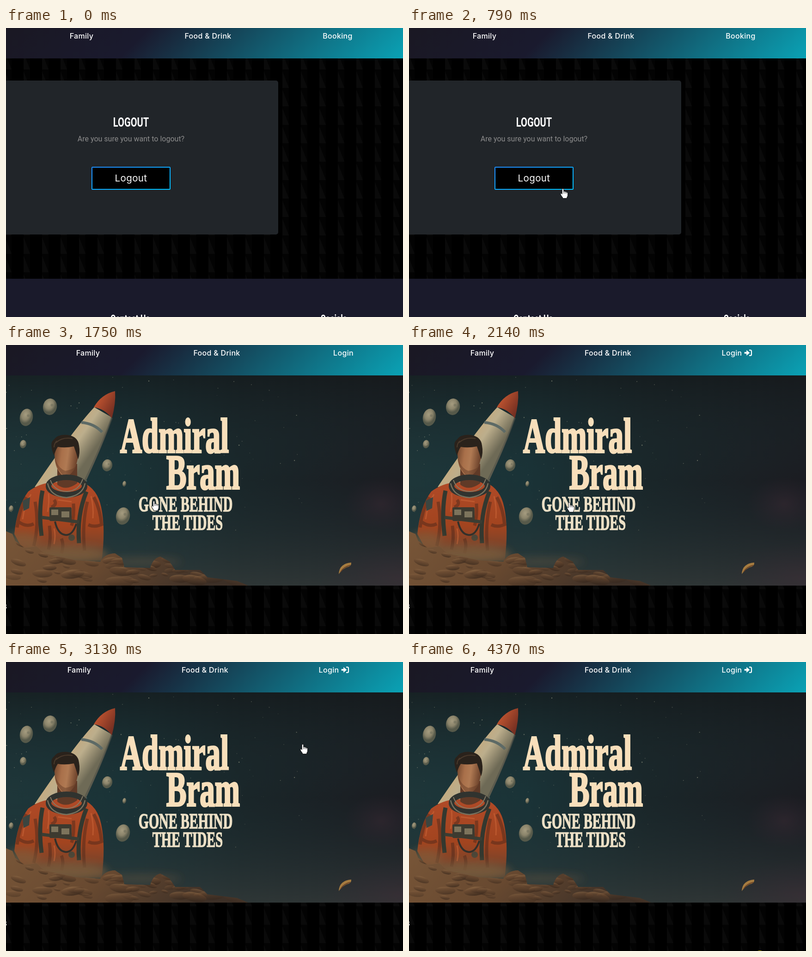
Recreate the animation shown at these times as an HTML page. Size 859 by 627 pixels, loop 4.43 s.

```html
<!DOCTYPE html>
<html lang="en">
<head>
<meta charset="utf-8">
<title>Logout</title>
<style>
  html, body { margin: 0; width: 100%; height: 100%; overflow: hidden; background: #000; }
  svg { display: block; width: 100vw; height: 100vh; overflow: hidden; }
  .nav { font: 500 16px Inter, "Open Sans", sans-serif; letter-spacing: .3px; fill: #fff; }
  .mid { text-anchor: middle; }
  .head { font: 700 28px Roboto, sans-serif; fill: #fff; }
  .foot { font-size: 24px; }
  .note { font: 400 16px Roboto, sans-serif; fill: #8c8c8c; }
  .btn { font: 400 20.5px Inter, "Open Sans", sans-serif; letter-spacing: .4px; fill: #fff; }
  .title { font: 700 105px "Liberation Serif", serif; fill: #f8dfbb; stroke: #f8dfbb; stroke-width: 4px; }
  .sub { font: 700 46px "Liberation Serif", serif; fill: #ece0c6; stroke: #ece0c6; stroke-width: 1.6px; }
</style>
</head>
<body>
<svg viewBox="0 0 859 627" preserveAspectRatio="none">
  <defs>
    <linearGradient id="bar" gradientUnits="userSpaceOnUse" x1="0" y1="0" x2="462.5" y2="462.5">
      <stop offset="0" stop-color="#1a1823"/><stop offset=".335" stop-color="#1a1a2e"/>
      <stop offset="1" stop-color="#0aa2b5"/>
    </linearGradient>
    <linearGradient id="edge" x1="0" y1="0" x2="1" y2="1">
      <stop offset=".1" stop-color="#1e90ff"/><stop offset=".85" stop-color="#00bfff"/>
    </linearGradient>
    <linearGradient id="sky" x1="0" y1="0" x2="1" y2="0">
      <stop offset="0" stop-color="#1e3639"/><stop offset=".3" stop-color="#1a3337"/>
      <stop offset=".6" stop-color="#1a2629"/><stop offset="1" stop-color="#1b1c21"/>
    </linearGradient>
    <linearGradient id="haze" x1="0" y1="0" x2="0" y2="1">
      <stop offset="0" stop-color="#14191b" stop-opacity=".7"/><stop offset=".5" stop-color="#1d3034" stop-opacity="0"/>
      <stop offset="1" stop-color="#393f3d" stop-opacity=".65"/>
    </linearGradient>
    <radialGradient id="plum">
      <stop offset="0" stop-color="#432c38" stop-opacity=".4"/><stop offset="1" stop-color="#3a2634" stop-opacity="0"/>
    </radialGradient>
    <linearGradient id="hull" gradientUnits="userSpaceOnUse" x1="120" y1="190" x2="185" y2="235">
      <stop offset="0" stop-color="#c9a878"/><stop offset=".5" stop-color="#bcae8c"/><stop offset="1" stop-color="#6e6a56"/>
    </linearGradient>
    <linearGradient id="cone" gradientUnits="userSpaceOnUse" x1="200" y1="120" x2="234" y2="140">
      <stop offset="0" stop-color="#b9512f"/><stop offset="1" stop-color="#763022"/>
    </linearGradient>
    <linearGradient id="suit" x1="0" y1="0" x2="0" y2="1">
      <stop offset="0" stop-color="#b04a27"/><stop offset=".55" stop-color="#a2441f"/>
      <stop offset=".8" stop-color="#7d442a"/><stop offset="1" stop-color="#5f432e" stop-opacity=".5"/>
    </linearGradient>
    <linearGradient id="skin" x1="0" y1="0" x2="1" y2=".2">
      <stop offset="0" stop-color="#6d432b"/><stop offset=".35" stop-color="#a9704a"/>
      <stop offset=".6" stop-color="#b07a53"/><stop offset="1" stop-color="#6c422b"/>
    </linearGradient>
    <linearGradient id="rock" x1="0" y1="0" x2="1" y2=".25">
      <stop offset="0" stop-color="#785638"/><stop offset=".5" stop-color="#684930"/><stop offset="1" stop-color="#3d3027"/>
    </linearGradient>
    <linearGradient id="pebble" x1="0" y1="0" x2=".3" y2="1">
      <stop offset="0" stop-color="#a27b52"/><stop offset=".4" stop-color="#674830"/><stop offset="1" stop-color="#35251a"/>
    </linearGradient>
    <radialGradient id="stone" cx=".4" cy=".35">
      <stop offset="0" stop-color="#a59c80"/><stop offset=".6" stop-color="#8b846b"/><stop offset="1" stop-color="#56594a"/>
    </radialGradient>
    <pattern id="tile" patternUnits="userSpaceOnUse" x="38" y="14" width="40" height="40">
      <rect width="40" height="40"/>
      <rect width="14" height="40" fill="#030303"/>
      <path d="M0 0V36H14Z" fill="#0a0a0a"/>
    </pattern>
    <filter id="soft" x="-50%" y="-100%" width="200%" height="300%"><feGaussianBlur stdDeviation="12"/></filter>
    <filter id="inner" x="-20%" y="-50%" width="140%" height="200%"><feGaussianBlur stdDeviation="5"/></filter>
    <filter id="dust" x="-30%" y="-80%" width="160%" height="260%"><feGaussianBlur stdDeviation="9"/></filter>
    <clipPath id="face"><rect x="185" y="301" width="171" height="50"/></clipPath>
    <clipPath id="frame"><rect y="66" width="859" height="456"/></clipPath>
    <clipPath id="land"><use href="#ground"/></clipPath>
  </defs>

  <rect y="66" width="859" height="561" fill="url(#tile)"/>

  <g id="logout">
    <rect x="-20" y="114" width="609" height="334" rx="5" fill="#212529"/>
    <text class="head mid" transform="translate(270.5 214) scale(.72 1)">LOGOUT</text>
    <text class="note mid" x="270.5" y="246">Are you sure you want to logout?</text>
    <rect class="glow" x="181" y="297" width="179" height="58" fill="#00a8e8" opacity="0" filter="url(#soft)"/>
    <rect x="185" y="301" width="171" height="50" rx="2"/>
    <g clip-path="url(#face)"><rect class="glow" x="185" y="301" width="171" height="50" fill="none"
      stroke="#00bfff" stroke-width="9" opacity="0" filter="url(#inner)"/></g>
    <rect x="186" y="302" width="169" height="48" rx="1" fill="none" stroke="url(#edge)" stroke-width="2"/>
    <text class="btn mid" x="270.5" y="333">Logout</text>
    <rect y="544" width="859" height="83" fill="#1a1a2b"/>
    <text class="head foot" transform="translate(226 639) scale(.72 1)">Contact Us</text>
    <text class="head foot" transform="translate(681 639) scale(.72 1)">Socials</text>
  </g>

  <g id="home">
    <g clip-path="url(#frame)">
      <rect y="66" width="859" height="456" fill="url(#sky)"/>
      <rect y="66" width="859" height="456" fill="url(#haze)"/>
      <ellipse cx="812" cy="345" rx="80" ry="60" fill="url(#plum)"/>
      <ellipse cx="850" cy="505" rx="170" ry="80" fill="url(#plum)"/>
      <g id="stars"></g>
      <g id="stones" fill="url(#stone)"></g>

      <path d="M191 135Q150 178 62 308L165 312Q208 222 229 157Z" fill="url(#hull)"/>
      <path d="M236 100Q206 107 190 135Q213 138 229 159Q238 127 236 100Z" fill="url(#cone)"/>
      <path d="M163 168Q190 170 208 189" fill="none" stroke="#5d6a66" stroke-width="6"/>
      <path d="M229 158Q205 225 165 306" fill="none" stroke="#4f5149" stroke-width="4" opacity=".6"/>

      <path d="M18 410Q24 350 48 318Q72 300 100 298H166Q198 312 206 352Q216 400 207 468H50Z" fill="url(#suit)"/>
      <g fill="none" stroke="#4f2a1c" stroke-width="7" opacity=".5">
        <path d="M63 340Q72 390 60 436M176 340Q164 390 170 446M28 384Q44 396 60 388M178 390Q193 397 210 388"/>
        <path d="M104 336Q112 346 98 352M146 344Q148 370 142 392M94 392Q98 420 92 444M120 420Q126 434 120 452"/>
        <path d="M190 330Q204 356 207 392M44 330Q28 360 24 396"/>
      </g>
      <g fill="none" stroke="#d0693a" stroke-width="3" opacity=".5">
        <path d="M54 324Q40 346 36 378M92 322Q94 340 90 362M184 328Q190 350 188 376M112 336L142 340M104 398Q108 414 104 432"/>
      </g>
      <path d="M111 262V303Q130 318 154 300V258Z" fill="#603a27"/>
      <path d="M105 222Q104 252 110 266Q117 282 127 286Q138 285 149 268Q158 246 157 218Q130 204 105 222Z" fill="url(#skin)"/>
      <path d="M105 244Q107 268 127 286Q140 284 151 264Q140 272 128 273Q113 268 105 244Z" fill="#5f3925" opacity=".45"/>
      <path d="M104 240Q93 213 103 206Q112 193 132 195Q156 198 158 218Q161 234 156 248Q152 234 147 220Q128 224 112 221Q107 228 104 240Z" fill="#2a221b"/>
      <path d="M108 212Q122 199 144 203M104 222Q104 214 110 208" fill="none" stroke="#584433" stroke-width="2" opacity=".7"/>
      <ellipse cx="131" cy="306" rx="39" ry="19" fill="none" stroke="#30332f" stroke-width="12"/>
      <path d="M90 300Q96 329 131 331Q166 327 171 300" fill="none" stroke="#77725f" stroke-width="2.5"/>
      <path d="M96 293Q104 317 132 318Q158 316 166 291" fill="none" stroke="#847b66" stroke-width="2"/>
      <path d="M79 316Q70 360 77 414M174 318Q153 370 158 430" fill="none" stroke="#33382f" stroke-width="9"/>
      <path d="M77 374L158 384" stroke="#3b3d33" stroke-width="7"/>
      <rect x="94" y="352" width="48" height="30" rx="3" fill="#3d3a2f"/>
      <path d="M98 357H113V369H98ZM120 361H137V374H120Z" fill="#7d745c"/>
      <path d="M106 383Q112 410 128 412T152 388" fill="none" stroke="#33302a" stroke-width="4"/>
      <circle cx="142" cy="418" r="7" fill="#4b4638"/>
      <path d="M36 338L52 330L50 354L38 360Z" fill="#3b4540"/>

      <g fill="#80603f" filter="url(#dust)">
        <ellipse cx="124" cy="455" rx="95" ry="20" opacity=".75"/>
        <ellipse cx="36" cy="425" rx="36" ry="18" opacity=".6"/>
        <ellipse cx="290" cy="470" rx="90" ry="10" opacity=".3"/>
      </g>
      <path id="ground" d="M0 404L14 410L20 425L40 440L66 437L82 452L118 460L150 467L204 470Q214 452 236 452L251 462L256 482L312 484Q318 462 334 459L354 470L366 488L420 488L436 504L500 512L524 522H0Z" fill="url(#rock)"/>
      <g id="rubble" fill="url(#pebble)" clip-path="url(#land)"></g>
      <path d="M720 497Q721 474 747 472Q748 480 738 482Q728 486 720 497Z" fill="#a67c40"/>
      <path d="M724 492Q731 481 745 478" fill="none" stroke="#6b4327" stroke-width="2"/>

      <g id="titles"></g>
    </g>
    <text class="head" style="font-size:20px" x="2" y="573" text-anchor="end">s</text>
  </g>

  <rect width="859" height="66" fill="url(#bar)"/>
  <g class="nav mid">
    <text id="n0" y="23">Family</text><text id="n1" y="23">Food &amp; Drink</text><text id="n2" y="23"></text>
  </g>
  <g id="icon" fill="none" stroke="#fff" stroke-width="2.2">
    <path d="M736 11.2H738.5Q741 11.2 741 13.6V20.4Q741 22.8 738.5 22.8H736"/>
    <path d="M726 15.5H730.5V11.5L737 17L730.5 22.5V18.5H726Z" fill="#fff" stroke-width=".6"/>
  </g>

  <circle id="ring" cx="759" cy="638" r="12" fill="#b9aa00"/>
  <g id="cursor">
    <path id="arrow" d="M0 0V16L3.8 12.5L6.5 18.5L9 17.4L6.4 11.6H11.6Z" fill="#fff" stroke="#000" stroke-width=".8"/>
    <g id="hand">
      <path d="M-1.8 1.6Q0 -1 1.8 1.6V6.6Q3.8 5.4 4.8 7.2Q6.8 6.4 7.8 8.2Q10.6 7.8 10.6 10.6V14.5Q10.6 17.5 8.8 19.2V21.6H-.6V19.6Q-3.4 16.6 -5 13Q-5.6 10.4 -3.4 10.6L-1.8 12.4Z" fill="#fff" stroke="#000" stroke-width=".9"/>
      <path d="M1.8 6.6V11M4.9 7.6V11M7.8 8.6V11.4" stroke="#000" stroke-width=".8"/>
    </g>
  </g>
</svg>
<script>
const LOOP = 4430, SWAP = 1750, ICON_IN = 1780;
const $ = id => document.getElementById(id);
const show = (id, on) => { $(id).style.display = on ? '' : 'none'; };

// Cursor tip: time, x, y
const path = [
  [160, 788, 622], [240, 715, 577], [340, 595, 508], [440, 485, 442], [540, 408, 394], [670, 355, 362],
  [730, 343, 354], [790, 333, 348], [920, 323, 340], [1020, 320, 338],
  [2040, 320, 338], [2080, 322, 347], [2140, 346, 342], [2200, 420, 298], [2280, 540, 232],
  [2340, 605, 204], [2370, 613, 201], [2420, 604, 203], [2460, 595, 198],
  [2600, 595, 198], [2660, 587, 188], [2840, 587, 188], [2960, 603, 181], [3130, 642, 178],
  [3200, 673, 207], [3280, 718, 300], [3360, 748, 407],
  [3420, 754, 447], [3540, 762, 535], [3640, 767, 594], [3710, 769, 630]
];

function tipAt(t) {
  const i = path.findIndex(p => p[0] > t);
  if (i < 1) return null;
  const [t0, x0, y0] = path[i - 1], [t1, x1, y1] = path[i];
  const k = (t - t0) / (t1 - t0);
  return [x0 + (x1 - x0) * k, y0 + (y1 - y0) * k];
}

let seed = 11;
const rand = () => (seed = seed * 16807 % 2147483647) / 2147483647;
const repeat = (n, make) => Array.from({ length: n }, make).join('');

$('stars').innerHTML = repeat(110, () =>
  `<circle cx="${rand() ** 1.5 * 640}" cy="${70 + rand() * 340}" r="${.4 + rand() * .8}"
    fill="#b9b89c" opacity="${.15 + rand() * .45}"/>`);

// Loose rocks, larger towards the bottom
$('rubble').innerHTML = repeat(90, (_, i) => {
  const y = 425 + i, x = rand() * 520, w = 6 + rand() * (6 + i / 4);
  return `<ellipse cx="${x}" cy="${y}" rx="${w}" ry="${w * .38}" opacity="${.3 + rand() * .4}"
    transform="rotate(${rand() * 30 - 8} ${x} ${y})"/>`;
});

$('stones').innerHTML = [
  [44, 157, 14, 19], [95, 134, 15, 18], [37, 215, 7, 9], [219, 261, 11, 13], [256, 301, 4, 6], [253, 371, 15, 19], [11, 355, 5, 7]
].map(([x, y, a, b]) =>
  `<ellipse cx="${x}" cy="${y}" rx="${a}" ry="${b}" transform="rotate(12 ${x} ${y})"/>` +
  `<circle cx="${x + a * .3}" cy="${y - b * .2}" r="${a * .2}" fill="#6a6a58" opacity=".5"/>`).join('');

// Condensed display lettering
$('titles').innerHTML = [
  ['title', 247, 233, 'start', 'Admiral'], ['title', 347, 312, 'start', 'Bram'],
  ['sub', 388.5, 361, 'middle', 'GONE BEHIND'], ['sub', 393, 401, 'middle', 'THE TIDES']
].map(([c, x, y, a, s]) =>
  `<text class="${c}" text-anchor="${a}" transform="translate(${x} ${y}) scale(.62 1)">${s}</text>`).join('');

const glows = document.querySelectorAll('.glow');
function draw(t) {
  const home = t >= SWAP, icon = t >= ICON_IN;
  show('logout', !home);
  show('home', home);
  show('icon', icon);
  show('ring', t >= 4370);
  $('n2').textContent = home ? 'Login' : 'Booking';
  const xs = icon ? [158.5, 430.5, 698.5] : home ? [177.5, 456, 730] : [163.5, 437, 717.5];
  xs.forEach((x, i) => $('n' + i).setAttribute('x', x));

  const k = Math.min(1, Math.max(0, (t - 800) / 400));
  const lit = k * k * (3 - 2 * k);
  glows.forEach((g, i) => g.setAttribute('opacity', lit * (i ? .6 : .5)));

  const tip = tipAt(t);
  show('cursor', tip);
  if (!tip) return;
  const [x, y] = tip;
  const link = home ? y < 522 : x > 185 && x < 356 && y > 301 && y < 351;
  show('hand', link);
  show('arrow', !link);
  $('cursor').setAttribute('transform', `translate(${Math.round(x)} ${Math.round(y)})`);
}

const start = performance.now();
function tick() {
  draw((performance.now() - start) % LOOP);
  requestAnimationFrame(tick);
}
tick();
</script>
</body>
</html>
```
